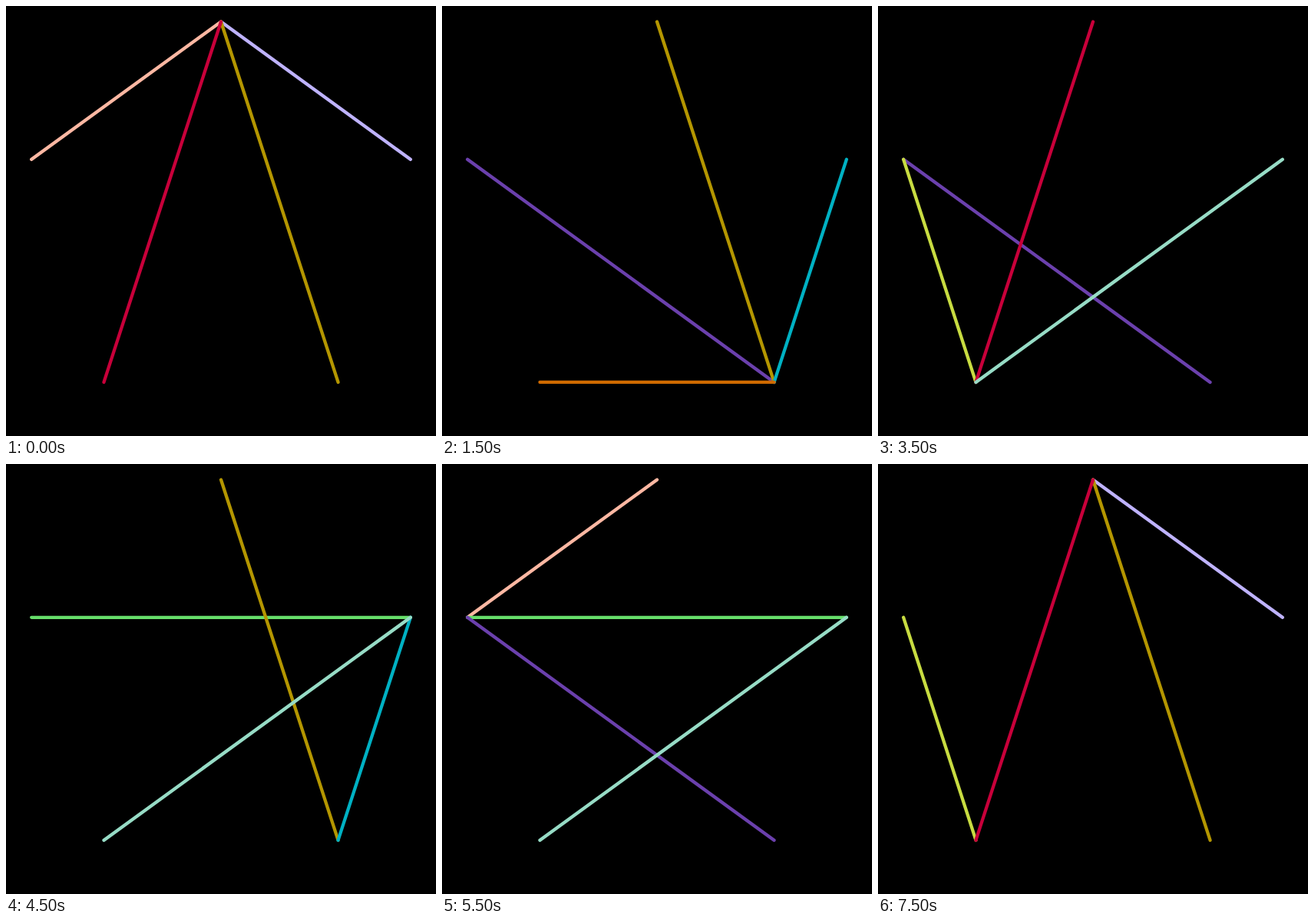
These frames come from a looping animation (560 by 560 pixels, 8 s). An HTML page:

```html
<!DOCTYPE html>
<html lang="en">
<head>
<meta charset="utf-8">
<title>Spanning trees of five points</title>
<style>
  html, body { margin: 0; width: 100%; height: 100%; overflow: hidden; background: #000; }
  svg { display: block; width: 100vw; height: 100vh; }
  line { stroke-width: 4.3; stroke-linecap: round; }
</style>
</head>
<body>
<svg viewBox="0 0 560 560"></svg>
<script>
const STEP = 500, COUNT = 16, RADIUS = 259.5;
const svg = document.querySelector('svg');

// Corners run counter-clockwise from the top: 0 top, 1 left, ... 4 right.
const corner = i => {
  const a = i * 2 * Math.PI / 5;
  return [280 - RADIUS * Math.sin(a), 280 - RADIUS * Math.cos(a)];
};
const key = (a, b) => Math.min(a, b) + '-' + Math.max(a, b);

// Edges in painting order, bottom to top.
const colors = {
  '0-1': '#ffb8a3', '1-4': '#66de6a', '1-3': '#6b40ad', '1-2': '#c8dc41',
  '0-4': '#bfb3ff', '0-3': '#b49600', '0-2': '#c8003a',
  '3-4': '#00b1c3', '2-4': '#97dcc6', '2-3': '#cf6a00'
};

const lines = Object.entries(colors).map(([id, color]) => {
  const [a, b] = id.split('-').map(Number);
  const [x1, y1] = corner(a), [x2, y2] = corner(b);
  const el = document.createElementNS('http://www.w3.org/2000/svg', 'line');
  for (const [k, v] of Object.entries({ x1, y1, x2, y2, stroke: color })) el.setAttribute(k, v);
  svg.append(el);
  return { id, el };
});

// Each shape is turned through all five corners: first the star,
// then stars whose corner 1 hangs from corner 4, 3 or 2 instead of the centre.
const hooks = [0, 4, 3, 2];
function tree(n) {
  const turn = n % 5, hook = hooks[Math.floor(n / 5)];
  const edge = (a, b) => key((a + turn) % 5, (b + turn) % 5);
  return [edge(hook, 1), edge(0, 2), edge(0, 3), edge(0, 4)];
}

let shown = -1;
function draw(now) {
  const n = Math.floor(Math.max(0, now - start) / STEP) % COUNT;
  if (n !== shown) {
    const edges = tree(n);
    for (const { id, el } of lines) el.style.display = edges.includes(id) ? '' : 'none';
    shown = n;
  }
  requestAnimationFrame(draw);
}
const start = performance.now();
draw(start);
</script>
</body>
</html>
```
